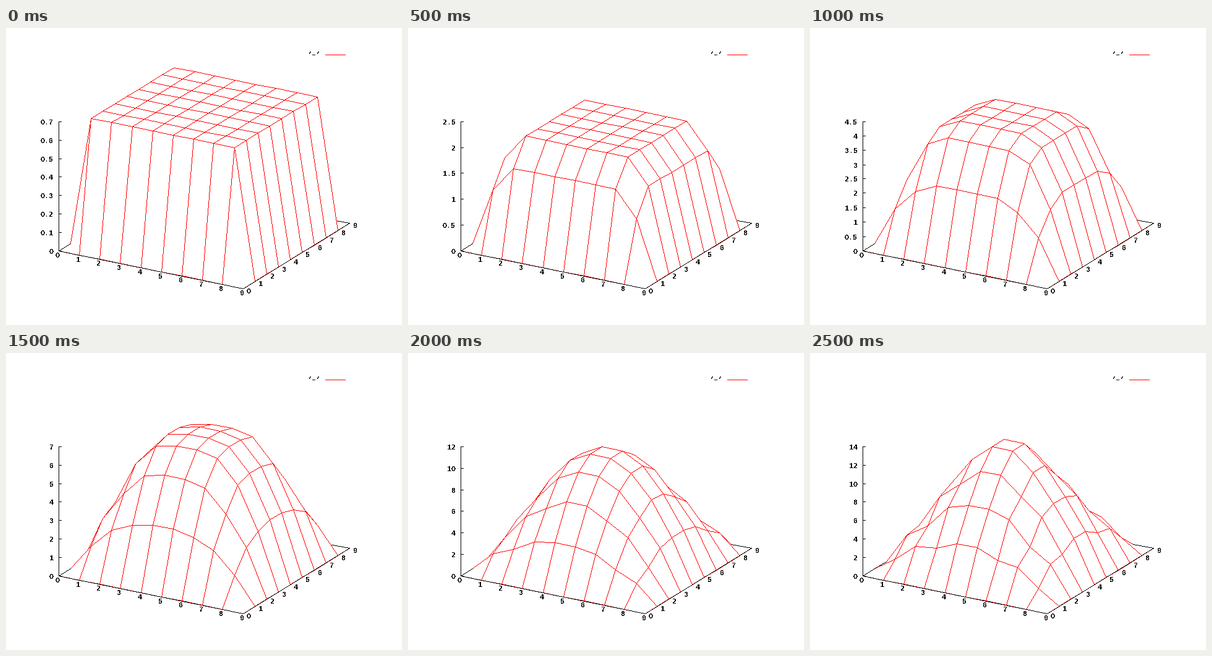
These frames come from a looping animation (640 by 480 pixels, 3 s). A matplotlib script:

```python
import matplotlib.pyplot as plt
import numpy as np
from matplotlib.animation import FuncAnimation

W, H = 640, 480
N = 10                      # grid points per side
RATE = 0.7                  # wave speed squared, also the constant load
RED, BLACK, WHITE = (255, 0, 0), (0, 0, 0), (255, 255, 255)
MIDDLE = (320, 233)
SCALE = (172.5, 121.5)
TILT, TURN = np.radians(60), np.radians(30)
CHAR = 7                    # text pitch in pixels
AXES = [(0.7, 0.1), (2.5, 0.5), (4.5, 0.5), (7, 1), (12, 2), (14, 2)]


def simulate(steps):
    """Membrane fixed at its rim, pushed up by a constant load."""
    prev, cur = np.zeros((N, N)), np.zeros((N, N))
    result = []
    for _ in range(steps):
        inner = cur[1:-1, 1:-1]
        lap = (cur[2:, 1:-1] + cur[:-2, 1:-1] + cur[1:-1, 2:]
               + cur[1:-1, :-2] - 4 * inner)
        new = np.zeros((N, N))
        new[1:-1, 1:-1] = 2 * inner - prev[1:-1, 1:-1] + RATE * (lap + 1)
        prev, cur = cur, new
        result.append(new)
    return result


def project(x, y, z=0.0):
    """Screen pixel, cut towards the middle; z is a fraction of the axis."""
    x, y, z = 2 * x / (N - 1) - 1, 2 * y / (N - 1) - 1, 2 * z - 1
    across = x * np.cos(TURN) + y * np.sin(TURN)
    depth = y * np.cos(TURN) - x * np.sin(TURN)
    up = depth * np.cos(TILT) + z * np.sin(TILT)
    return MIDDLE[0] + int(across * SCALE[0]), MIDDLE[1] - int(up * SCALE[1])


def line(img, a, b, color):
    n = max(abs(b[0] - a[0]), abs(b[1] - a[1])) + 1
    xs = np.floor(np.linspace(a[0], b[0], n) + 0.5).astype(int)
    ys = np.floor(np.linspace(a[1], b[1], n) + 0.5).astype(int)
    img[ys, xs] = color


def fill_triangle(img, pts):
    (x0, y0), (x1, y1) = np.min(pts, axis=0), np.max(pts, axis=0)
    ys, xs = np.mgrid[y0:y1 + 1, x0:x1 + 1]
    sides = []
    for (px, py), (qx, qy) in zip(pts, pts[1:] + pts[:1]):
        sides.append((qx - px) * (ys - py) - (qy - py) * (xs - px))
    sides = np.array(sides)
    inside = (sides >= 0).all(axis=0) | (sides <= 0).all(axis=0)
    img[y0:y1 + 1, x0:x1 + 1][inside] = WHITE


def draw_cell(img, u, top, i, j):
    corners = [(i, j), (i + 1, j), (i + 1, j + 1), (i, j + 1)]
    pts = [project(x, y, u[x, y] / top) for x, y in corners]
    fill_triangle(img, [pts[0], pts[1], pts[3]])
    fill_triangle(img, [pts[1], pts[2], pts[3]])
    flat = [u[c] == 0 for c in corners]
    edges = [(k, (k + 1) % 4) for k in range(4)]
    # edges on the floor belong to the black border, drawn last
    for a, b in sorted(edges, key=lambda e: flat[e[0]] and flat[e[1]]):
        line(img, pts[a], pts[b], BLACK if flat[a] and flat[b] else RED)


def draw_front(img, rim):
    """Straight black border over the stepwise rim of the mesh."""
    for a, b in zip(rim, rim[1:]):
        line(img, a, b, RED)
    line(img, rim[0], rim[-1], BLACK)


def ticks(top, step):
    return [(k * step, project(0, 0, k * step / top))
            for k in range(int(round(top / step)) + 1)]


def render(u, top, step):
    img = np.full((H, W, 3), 255, np.uint8)
    for j in reversed(range(N - 1)):        # far rows first
        for i in range(N - 1):
            draw_cell(img, u, top, i, j)
    draw_front(img, [project(k, 0) for k in range(N)])
    draw_front(img, [project(N - 1, k) for k in range(N)])
    line(img, project(0, 0), project(0, 0, 1), BLACK)
    for _, (x, y) in ticks(top, step):
        line(img, (x, y), (x + 4, y), BLACK)
    line(img, (516, 43), (548, 43), RED)
    return img


plt.rcParams.update({"text.antialiased": False, "text.hinting": "native",
                     "text.hinting_factor": 1})
fig = plt.figure(figsize=(8, 6), dpi=80, facecolor="white")
ax = fig.add_axes([0, 0, 1, 1])
ax.axis("off")

pictures = [render(u, *axis) for u, axis in zip(simulate(len(AXES)), AXES)]
view = ax.imshow(pictures[0], interpolation="nearest", aspect="auto")
ax.set_xlim(-0.5, W - 0.5)
ax.set_ylim(H - 0.5, -0.5)


def plain(text):
    """Capital O stands in for a zero without an inner dot."""
    return text.replace("0", "O")


def label(x, y, text=""):
    return ax.text(x, y, plain(text), ha="left", va="baseline",
                   family="Liberation Mono", weight="bold",
                   size=12 * 72 / 80, color="black")


for k in range(N):
    x, y = project(k, 0)
    label(x - 5.5, y + 10.5, str(k))
    x, y = project(N - 1, k)
    label(x + 5.5, y + 7.5, str(k))
label(487.5, 46.5, "\u2019\u2013\u2019")
z_labels = [label(0, 0) for _ in range(N)]


def update(n):
    view.set_data(pictures[n])
    marks = ticks(*AXES[n])
    for k, text in enumerate(z_labels):
        text.set_visible(k < len(marks))
        if k < len(marks):
            value, (x, y) = marks[k]
            number = f"{value:g}"
            text.set_text(plain(number))
            text.set_position((x - 8.5 - CHAR * len(number), y + 4.5))
    return [view, *z_labels]


anim = FuncAnimation(fig, update, frames=len(AXES), interval=500,
                     repeat=True, repeat_delay=0)
plt.show()
```
